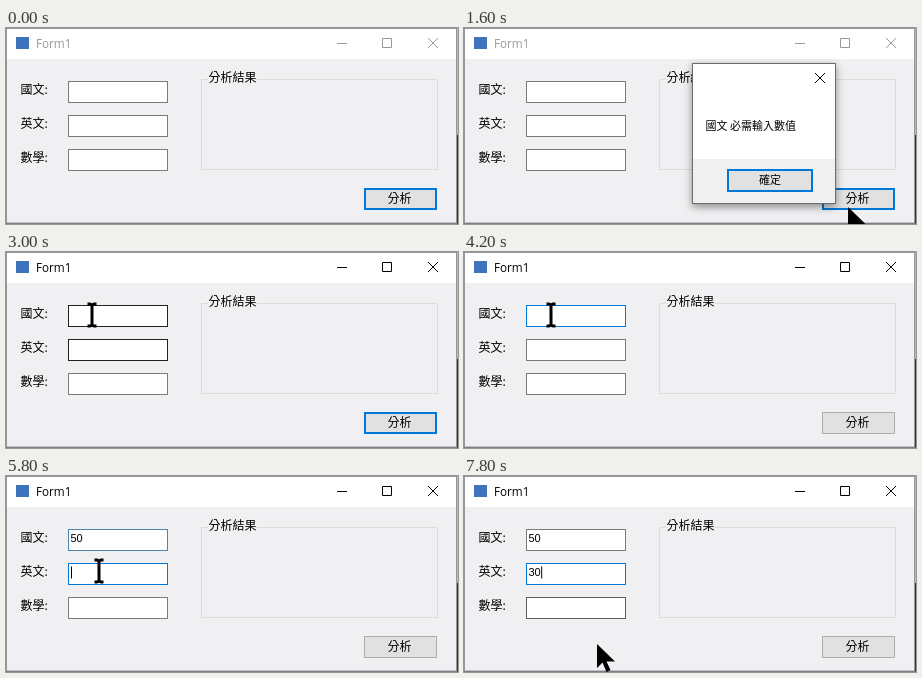
An HTML page for the animation above (8000 ms loop, 452 by 196 pixels).

```html
<!DOCTYPE html>
<html lang="zh-Hant">
<head>
<meta charset="utf-8">
<title>Form1</title>
<style>
  html, body { margin: 0; width: 100%; height: 100%; overflow: hidden; }
  svg { display: block; width: 452px; height: 196px; }
  text { font: 12px "Noto Sans CJK TC", "Noto Sans CJK", "Noto Sans CJK JP", sans-serif; fill: #000; }
  .title { font: 11.7px "Open Sans", "Noto Sans", sans-serif; }
  .digits { font: 11px "Liberation Sans", sans-serif; }
  .small { font-size: 11px; }
  .line { fill: none; stroke: #000; }
  .field { fill: #fff; stroke: #7a7a7a; }
  .mid { text-anchor: middle; }
  #bar.inactive text { fill: #999; }
  #bar.inactive .line { stroke: #999; }
</style>
</head>
<body>
<svg viewBox="0 0 452 196">
  <defs>
    <filter id="shadow" x="-20%" y="-20%" width="140%" height="140%">
      <feDropShadow dx="0" dy="3" stdDeviation="4" flood-opacity=".42"/>
    </filter>
  </defs>

  <rect width="452" height="196" fill="#b4b8ba"/>
  <path d="M450 107h2v89h-2z" fill="#333639"/>
  <path d="M0 195h452v1H0z" fill="#606669"/>
  <rect x=".5" y=".5" width="450" height="194.5" fill="#f0f0f2" stroke="#92989c"/>
  <path d="M1 1h449v30H1z" fill="#fff"/>

  <g id="bar">
    <rect x="10" y="9" width="13" height="12" fill="#3f74bd"/>
    <text class="title" x="30" y="20">Form1</text>
    <path class="line" d="M331 15.5h10M376.500 10.500h9v9h-9zM422 10l10 10M432 10l-10 10"/>
  </g>

  <g id="rows"></g>

  <path class="line" style="stroke:#dcdcdc" d="M202 51.500H195.500V141.500H431.500V51.500H251"/>
  <text x="202.500" y="54">分析結果</text>

  <rect id="analyse"/>
  <text class="mid" x="393.500" y="175">分析</text>

  <g id="dialog">
    <rect x="228.500" y="35.500" width="143" height="140" fill="#fff" stroke="#6c6c6c" filter="url(#shadow)"/>
    <path d="M229 131h142v44H229z" fill="#f0f0f0"/>
    <path class="line" d="M351 45l10 10M361 45l-10 10"/>
    <text class="small" x="241.500" y="102">國文 必需輸入數值</text>
    <rect id="ok"/>
    <text class="small mid" x="306" y="156">確定</text>
  </g>

  <path id="arrow" d="M0 0V24L5.500 18.500L9.500 28L13.500 26L9.500 17.500H18Z"/>
  <path id="beam" fill="none" stroke="#000" stroke-width="3"
        d="M-4.500 -11H-2L0 -10L2 -11H4.500M0 -10V10M-4.500 11H-2L0 10L2 11H4.500"/>
</svg>

<script>
const LOOP = 8000, STEP = 200;
const BLUE = '#0078d7', GREY = '#7a7a7a', DARK = '#202020';
const $ = id => document.getElementById(id);

// Each table row is [start time, ...values], held until the next row.
const pointer = [
  [0, ''], [400, 'arrow', 438, 122], [600, 'arrow', 408, 160], [800, 'arrow', 384, 179],
  [1800, 'arrow', 366, 172], [2000, 'arrow', 338, 160], [2200, 'arrow', 319, 153],
  [2800, 'beam', 142, 97], [3000, 'beam', 86, 63], [4200, 'beam', 87, 63],
  [5400, 'beam', 90, 78], [5600, 'beam', 93, 95],
  [7200, 'beam', 98, 100], [7400, 'arrow', 110, 116], [7600, 'beam', 122, 133], [7800, 'arrow', 133, 168]
];
const typed = [
  [[0, ''], [4600, '5'], [4800, '50']],
  [[0, ''], [6600, '3'], [7000, '30']],
  [[0, '']]
];
const borders = [
  [[0, GREY], [3000, DARK], [3200, BLUE], [5800, '#4c86ad'], [6000, GREY]],
  [[0, GREY], [2800, DARK], [3200, '#505050'], [3400, GREY], [5600, DARK], [5800, BLUE]],
  [[0, GREY], [7600, DARK], [7800, '#5c5c5c']]
];
const caret = [
  [0, -1], [3200, 0], [3800, -1], [4400, 0], [5400, -1], [5800, 1], [6400, -1], [6600, 1]
];
const active = [[0, false], [1000, true], [1400, false], [2600, true]];
const dialogOpen = [[0, false], [1400, true], [2600, false]];
const buttonState = [[0, 'focus'], [800, 'hover'], [1400, 'focus'], [3200, 'plain']];
const okState = [[0, 'focus'], [2200, 'hover']];

const looks = {
  focus: ['#e1e1e1', BLUE, 2],
  hover: ['#e5f1fb', BLUE, 1.3],
  plain: ['#e1e1e1', '#adadad', 1]
};

const at = (table, t) => table.findLast(row => row[0] <= t).slice(1);

function attrs(el, values) {
  for (const key in values) el.setAttribute(key, values[key]);
}

function add(parent, tag, values, text = '') {
  const el = document.createElementNS('http://www.w3.org/2000/svg', tag);
  attrs(el, values);
  el.textContent = text;
  return parent.appendChild(el);
}

function drawButton(el, state, x, y, w, h) {
  const [fill, stroke, line] = looks[state];
  attrs(el, {
    x: x + line / 2, y: y + line / 2, width: w - line, height: h - line,
    fill, stroke, 'stroke-width': line
  });
}

const rows = ['國文:', '英文:', '數學:'].map((label, i) => {
  const y = 53.5 + i * 34;
  add($('rows'), 'text', { x: 14.5, y: y + 12.5 }, label);
  return {
    box: add($('rows'), 'rect', { class: 'field', x: 62.5, y, width: 99, height: 21 }),
    value: add($('rows'), 'text', { class: 'digits', x: 64.5, y: y + 12.5 }),
    bar: add($('rows'), 'path', { class: 'line' }),
    y
  };
});

function render(t) {
  const [caretRow] = at(caret, t);
  rows.forEach((row, i) => {
    const [value] = at(typed[i], t);
    row.box.style.stroke = at(borders[i], t)[0];
    if (row.value.textContent !== value) row.value.textContent = value;
    const x = 65.5 + value.length * 6.1;
    attrs(row.bar, { d: caretRow === i ? `M${x} ${row.y + 3}v12` : '' });
  });

  $('bar').setAttribute('class', at(active, t)[0] ? '' : 'inactive');
  $('dialog').style.display = at(dialogOpen, t)[0] ? '' : 'none';
  drawButton($('analyse'), at(buttonState, t)[0], 358, 160, 73, 22);
  drawButton($('ok'), at(okState, t)[0], 263, 141, 86, 23);

  const [kind, x, y] = at(pointer, t);
  for (const id of ['arrow', 'beam']) {
    $(id).style.display = id === kind ? '' : 'none';
    if (id === kind) attrs($(id), { transform: `translate(${x} ${y})` });
  }
}

const start = performance.now();
function tick() {
  const t = (performance.now() - start) % LOOP;
  render(Math.floor(t / STEP) * STEP);
  requestAnimationFrame(tick);
}
tick();
</script>
</body>
</html>
```
